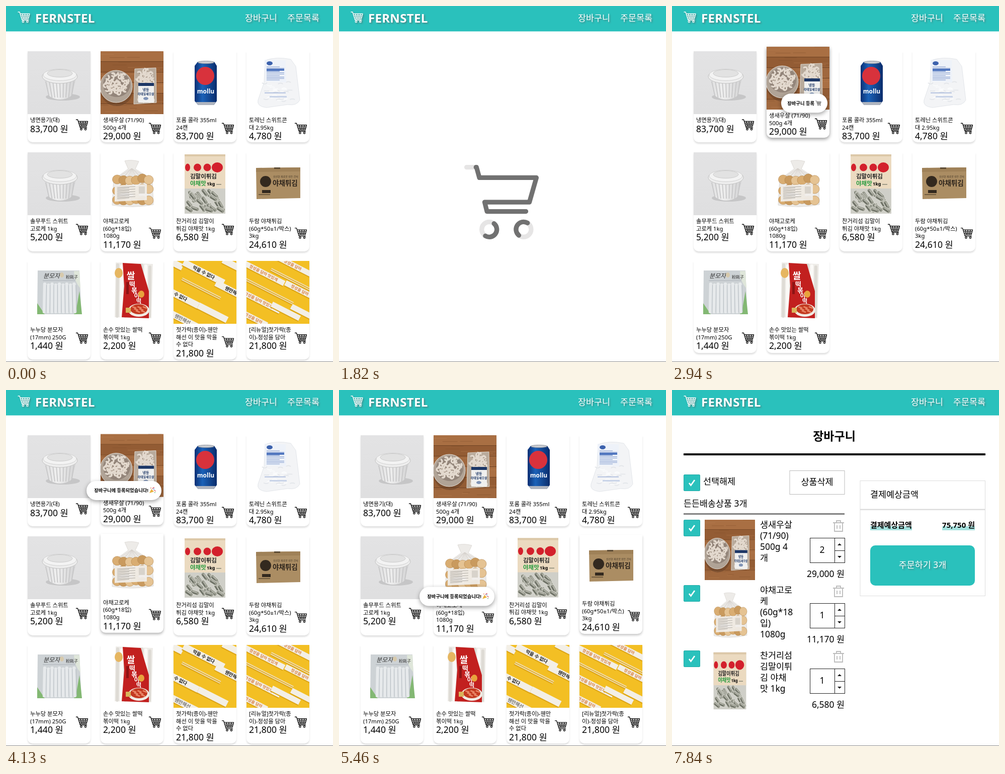
An HTML page that plays this animation: 650 px wide and 708 px high, repeating every 8 s.

```html
<!DOCTYPE html>
<html lang="ko">
<head>
<meta charset="utf-8">
<style>
html, body { margin: 0; width: 100%; height: 100%; overflow: hidden; background: #fff; }
svg { display: block; }
text { font-family: "Noto Sans", "Noto Sans CJK KR", "Noto Sans CJK", sans-serif; }
.glow { filter: drop-shadow(2px 2px 1.5px rgba(90, 90, 90, .55)); }
.bubble { filter: drop-shadow(0 3px 4px rgba(0, 0, 0, .38)); }
</style>
</head>
<body>
<svg id="stage" width="650" height="708" viewBox="0 0 650 708"></svg>
<script>
const TEAL = '#2ac1bc';
const rect = (x, y, w, h, fill, more = '') => `<rect x="${x}" y="${y}" width="${w}" height="${h}" fill="${fill}" ${more}/>`;
const oval = (x, y, rx, ry, fill, more = '') => `<ellipse cx="${x}" cy="${y}" rx="${rx}" ry="${ry}" fill="${fill}" ${more}/>`;
const shape = (d, fill, more = '') => `<path d="${d}" fill="${fill}" ${more}/>`;
const line = (d, color, w = 1, more = '') => `<path d="${d}" fill="none" stroke="${color}" stroke-width="${w}" ${more}/>`;
const text = (x, y, size, str, more = '') => `<text x="${x}" y="${y}" font-size="${size}" ${more}>${str}</text>`;
const group = (tf, body, more = '') => `<g transform="${tf}" ${more}>${body}</g>`;
const at = (x, y) => `translate(${x} ${y})`;
const times = (n, f) => Array.from({ length: n }, (_, i) => f(i)).join('');
const BOLD = 'font-weight="700"', MID = 'text-anchor="middle"', END = 'text-anchor="end"';
let seed = 11;
const rnd = (a, b) => a + (b - a) * ((seed = seed * 16807 % 2147483647) / 2147483647);

// ---- product pictures, each 125 x 125 ----
const bowl = rect(0, 0, 125, 125, 'url(#grey)') + oval(70, 91, 34, 7, '#c6c6c7') +
  shape('M31 50L41 88Q65 104 88 88L97 50Z', 'url(#shade)') +
  times(9, i => line(`M${36 + i * 7} 60L${43 + i * 5.5} 92`, '#c4c4c5', 1.6)) +
  oval(64, 50, 35, 14, '#eeeeee', 'stroke="#c2c2c2"') + oval(64, 47, 33, 11.5, '#f3f3f3', 'stroke="#cfcfcf"') +
  oval(64, 44, 25, 7.5, '#e2e2e2', 'stroke="#cbcbcb"');

const curls = (n, x, y, rx, ry) => times(n, () => {
  const a = rnd(0, 6.3), r = Math.sqrt(rnd(0, 1));
  return group(`translate(${x + rx * r * Math.cos(a)} ${y + ry * r * Math.sin(a)}) rotate(${rnd(0, 360)})`,
    line('M-3.5 1.5A3.6 3.6 0 1 1 3 2.5', '#e3d9ce', 3.4) + line('M-1.5 1A1.7 1.7 0 0 1 1.6 1', '#8f7d6d', 1));
});
const shrimp = rect(0, 0, 125, 125, '#a0683d') +
  times(6, i => rect(0, i * 21, 125, 20, ['#a96f43', '#935c34', '#a0683e'][i % 3]) + rect(0, i * 21 + 20, 125, 1, '#6e4223')) +
  times(40, i => line(`M${rnd(-10, 110)} ${rnd(0, 125)}h${rnd(10, 35)}`, i % 2 ? '#7f4e2a' : '#bb8252', .8, 'opacity=".6"')) +
  oval(32, 75, 33, 34, '#5c3a24', 'opacity=".45"') + oval(31, 70, 32, 32, '#b0a396', 'stroke="#e4ded6"') +
  oval(32, 66, 27, 25, '#93857a') + curls(56, 32, 65, 23, 21) +
  shape('M68 35L110 33L111 102L66 105Z', '#b9ab9c', 'stroke="#ddd5cb"') + curls(38, 89, 54, 16, 16) + curls(14, 89, 94, 16, 6) +
  rect(75, 63, 31, 39, '#f0f0ef') + rect(75, 63, 31, 6, '#1d3766') + text(90, 79, 7, '냉동', BOLD + MID + ' fill="#1d3766"') +
  text(90, 87, 6, '칵테일새우살', BOLD + MID + ' fill="#1d3766"') + oval(90, 94, 5, 3, '#7f93b5');

const can = rect(0, 0, 125, 125, '#fff') + shape('M48 21H81L86 29V99L80 107H49L42 99V29Z', 'url(#blue)') +
  oval(64.5, 22, 16, 2.6, '#c9ccd2', 'stroke="#8d929a"') + shape('M44 101H84L80 107H49Z', '#aeb4bf') +
  oval(63, 49, 18, 18, '#d8323c') + text(64, 84, 12, 'mollu', BOLD + MID + ' fill="#fff"');

const corn = rect(0, 0, 125, 125, '#fff') + shape('M37 18Q60 10 88 16L98 30L106 97Q100 109 82 106L40 112Q20 110 23 97L35 62Z', '#f3f4f6', 'stroke="#e3e6ea"') +
  times(26, i => line(`M${rnd(30, 88)} ${rnd(60, 100)}q5 ${rnd(-6, 6)} 10 0`, i % 2 ? '#e2e5e9' : '#fbfcfd', 1.6)) +
  shape('M36 17L78 18L79 62L37 60Z', '#eef2f9') + oval(46, 24, 6, 4, '#3d62ad') +
  times(10, i => line(`M40 ${31 + i * 2.9}h${i % 3 ? 35 : 26}`, i == 2 || i == 3 ? '#4b72bd' : '#8fa6d3', i == 2 ? 4 : 1.2)) +
  rect(36, 82, 42, 1.5, '#a3b5da') + rect(46, 89, 34, 3, '#c8d3e8');

const buns = rect(0, 0, 125, 125, '#fff') + shape('M48 17Q62 14 76 18L69 33L103 55L105 104Q64 112 23 105L26 54L55 33Z', '#edebe8', 'stroke="#dedbd7"') +
  times(11, i => line(`M62 32L${28 + i * 7} ${54 + i % 2 * 4}`, '#d3cfca', .8)) +
  times(18, i => oval(33 + i % 6 * 12.5, 54 + Math.floor(i / 6) * 20 + rnd(-3, 3), 9.5, 9, ['#d9ad72', '#c99a5e', '#e5c393'][i % 3], 'stroke="#b0834b" stroke-width=".6"')) +
  shape('M28 66L92 63L92 95L28 98Z', '#f1efec', 'opacity=".92"') +
  times(10, i => line(`M33 ${70 + i * 2.5}l${i % 2 ? 24 : 36} -2`, '#9f9b95', .8)) + rect(76, 68, 12, 14, '#d8d3cb');

const rolls = rect(0, 0, 125, 125, '#fff') + rect(22, 4, 81, 118, '#cfcfc8') +
  times(36, () => group(`translate(${rnd(28, 95)} ${rnd(78, 116)}) rotate(${rnd(15, 75)})`,
    rect(-9, -4, 18, 8, '#95978b', 'rx="4" stroke="#dcdcd4"') + line('M-6 1.5H5', '#565a50', 2, 'opacity=".7"') + line('M-5-1.5H4', '#c9cac0', 1))) +
  rect(22, 4, 81, 68, '#ebdac0') + rect(22, 4, 81, 4, '#dcc8a8') +
  times(3, i => oval(28 + i * 19.5, 30, i ? 7.5 : 5, 7.5, '#d3202c')) + oval(87, 30, 11, 10, '#d3202c') +
  text(33, 52, 11.5, '김말이튀김', BOLD + ' fill="#222"') + text(33, 66, 11.5, '야채맛', BOLD + ' fill="#279b3e"') + text(66, 66, 9, '1kg', BOLD) + rect(85, 63, 10, 1.5, '#887');

const box = rect(0, 0, 125, 125, '#fff') + shape('M19 31L107 30V91L20 93Z', '#ab8d63') + shape('M19 31L107 30V38L19 39Z', '#9f8158') +
  oval(38, 58, 11, 11, '#33291f') + text(52, 66, 13.5, '야채튀김', BOLD + ' fill="#2d241c"') +
  text(53, 50, 5, '신선한 재료로 만든 간식', 'fill="#493b2b"') + rect(31, 75, 17, 6, '#33291f') + rect(24, 83, 23, 2, '#705b3e') + rect(55, 30, 12, 3, '#5d4c35');

const noodles = rect(0, 0, 125, 125, '#fff') + shape('M20 19H103L107 106H19Z', '#cdd2d5') +
  shape('M19 84L34 106H19Z M103 60L108 106H92L97 94Z', '#83b873') + shape('M92 20H103L105 55Q92 40 92 20', '#dfe6da') +
  times(9, i => line(`M${34 + i * 7.3} ${46 + i % 2 * 2}L${33 + i * 7.6} 101`, '#e6e9eb', 6.4, 'stroke-linecap="round"') + line(`M${37.5 + i * 7.3} 48L${36.5 + i * 7.6} 102`, '#b3bac0', 1)) +
  text(31, 34, 12, '분모자', 'fill="#333" font-style="italic"') + text(76, 35, 8, '粉耗子', 'fill="#333"') + oval(68, 28, 4, 5, '#d7c9ac') + line('M30 39H95', '#a2a9b0', .8);

const sticks = rect(0, 0, 125, 125, '#fff') + shape('M30 3L104 6L101 114L28 112Z', '#eeece8') +
  times(9, i => line(`M${34 + i * 8} ${8 + i % 3 * 2}L${33 + i * 8} 110`, i % 2 ? '#fbfaf7' : '#dedbd5', 6, 'stroke-linecap="round"')) +
  shape('M44 4L80 6L96 60V114L42 112L47 50Z', '#c2201f') +
  [['쌀', 60, 36, 18], ['떡', 63, 51, 13], ['볶', 67, 63, 13], ['이', 72, 74, 12], ['떡', 76, 84, 11]].map(([c, x, y, s]) => text(x, y, s, c, BOLD + MID + ' fill="#fff"')).join('') +
  oval(36, 24, 8, 10, '#e6b661') + rect(51, 42, 5, 24, '#8d1414') + oval(81, 66, 6, 7, '#e8a33c') + oval(76, 98, 21, 13, '#f1ebe3') + oval(76, 96, 17, 10, '#c43a20') +
  times(7, i => line(`M${63 + i * 3.5} ${91 + i % 3 * 4}l8 3`, '#e98767', 2.5)) + rect(50, 93, 10, 10, '#d9b35b');

const strip = (x, y, w, h, str, color) => group(`translate(${x} ${y}) rotate(27)`,
  rect(-w / 2, 2 - h / 2, w, h, '#dba417') + rect(-w / 2, -h / 2, w, h, '#f3efe6') + text(0, h * .26, h * .72, str, BOLD + MID + ` fill="${color}"`));
const pair = (x, y, w) => group(`translate(${x} ${y}) rotate(27)`, rect(0, 2, w, 5.5, '#dba417') + rect(0, 0, w, 2, '#f0dcae') + rect(0, 3.5, w, 2, '#f0dcae'));
const yellow = rect(0, 0, 125, 125, '#f3bf24');
const paperA = yellow + strip(0, 4, 40, 13, '', '#222') + strip(60, 23, 90, 13, '막을 수 없다', '#222') + strip(118, 61, 76, 13, '웬만해선', '#222') +
  strip(14, 71, 84, 13, '수 없다', '#222') + strip(78, 103, 64, 13, '', '#222') + strip(18, 116, 64, 13, '웬만해선', '#777') + strip(118, 8, 44, 13, '', '#222') + pair(18, 33, 86);
const paperB = yellow + strip(34, 24, 92, 11, '정성을 담아 맛있게', '#d98243') + strip(106, 58, 64, 11, '정성을 담아', '#d98243') + strip(92, 8, 80, 11, '정성을 담아', '#d98243') +
  strip(24, 78, 96, 11, '정성을 담아 맛있게', '#d98243') + strip(78, 100, 62, 11, '', '#222') + strip(14, 114, 60, 11, '정성을 담아', '#d98243') +
  strip(116, 104, 60, 11, '', '#222') + pair(50, 14, 90) + pair(-4, 32, 110);

const pictures = { bowl, shrimp, can, corn, buns, rolls, box, noodles, sticks, paperA, paperB };
const products = [
  ['bowl', '냉면용기(대)', '83,700'], ['shrimp', '생새우살 (71/90)|500g 4개', '29,000'],
  ['can', '포롬 콜라 355ml|24캔', '83,700'], ['corn', '토레닌 스위트콘|대 2.95kg', '4,780'],
  ['bowl', '솔무푸드 스위트|고로케 1kg', '5,200'], ['buns', '야채고로케|(60g*18입)|1080g', '11,170'],
  ['rolls', '찬거리섬 김말이|튀김 야채맛 1kg', '6,580'], ['box', '두람 야채튀김|(60g*50±1/박스)|3kg', '24,610'],
  ['noodles', '누누당 분모자|(17mm) 250G', '1,440'], ['sticks', '손수 맛있는 쌀떡|볶이떡 1kg', '2,200'],
  ['paperA', '젓가락(종이)-웬만|해선 이 맛을 막을|수 없다', '21,800'], ['paperB', '[리뉴얼]젓가락(종|이)-정성을 담아', '21,800']
].map(([pic, title, price], i) => {
  const lines = title.split('|'), row = i >> 2;
  return { pic, lines, price, row, x: 43 + i % 4 * 145, y: [90, 291, 507][row], h: [181, 197, 196][row], icon: 146 + 7.3 * (lines.length - 1) };
});

const trolley = (x, y, color, w, s = 1) => group(`translate(${x} ${y}) scale(${s})`,
  `<g fill="none" stroke="${color}" stroke-width="${w}" stroke-linejoin="round" stroke-linecap="round">` +
  '<path d="M-11.5-10H-8.5L-3.5 6H9.5M-7.5-6.5H11.5L8.8 3.5H-4.2M-6.5-3.2H10.7M-5.3 .2H9.7M-3-6.5L-.6 3.5M2-6.5L2.4 3.5M7-6.5L5.6 3.5"/>' +
  '<circle cx="-1.5" cy="9" r="1.7"/><circle cx="7" cy="9" r="1.7"/></g>');
const popper = (x, y) => group(at(x, y), shape('M-6 5L-2-3L3 2Z', '#e9b23c') + line('M0-3Q1-6 4-6M3 0Q6-1 6 2', '#d65a6a', 1.2) +
  oval(3, -3, 1, 1, '#4a9be0') + oval(-3, -5, .9, .9, '#e06a3a') + oval(5, 4, .9, .9, '#58b368'));

const card = (p, i) => `<g id="card${i}">` + rect(0, 0, 125, p.h, '#fff', 'rx="10"') +
  `<use href="#${p.pic}" clip-path="url(#frame)"/>` +
  p.lines.map((s, k) => text(5, 141 + 14.6 * k, 11.3, s, 'font-weight="500"')).join('') +
  text(5, 160.7 + 14.7 * (p.lines.length - 1), 17.6, p.price + ' 원') + trolley(108, p.icon, '#111', 1.4) + '</g>';

const bubble = (id, w, str, icon) => `<g id="${id}">` + rect(-w, -19, w, 38, '#fff', 'rx="19" class="bubble"') +
  text(-26, 3.5, 9.3, str, BOLD + END) + icon + '</g>';

const POLY = 'points="4,4 21,4 26,22 124,22 112,64 35,64 39,80 106,80"';
const wheel = (x, more = '') => `<circle cx="${x}" cy="111" r="13" ${more}/>`;
const loader = group('translate(249 316) scale(1.15625)',
  `<g stroke="#e6e5e5">` + `<polyline ${POLY}/>` + wheel(43) + wheel(102) + '</g><g stroke="#717171">' +
  `<polyline id="body" ${POLY} stroke-dasharray="338"/>` + wheel(43, 'id="w1" stroke-dasharray="81.68"') + wheel(102, 'id="w2" stroke-dasharray="81.68"') + '</g>',
  'id="loader" fill="none" stroke-width="8" stroke-linecap="round" stroke-linejoin="round"');

const S = 17.4;
const check = y => rect(23.5, y + .5, 32, 32, TEAL, 'rx="1.5" stroke="#25aca8"') + line(`M34 ${y + 17}l3.5 4.5L45 ${y + 11}`, '#fff', 2.8);
const trash = (x, y) => line(`M${x - 11} ${y - 6}h22M${x - 4} ${y - 6}v-4h8v4M${x - 8} ${y - 6}v17h16v-17M${x - 3} ${y - 1}v7M${x + 3} ${y - 1}v7`, '#bcbcbc', 1.8);
const cartRow = (n, y, lines) => {
  const p = products[n];
  return check(y) + group(`translate(65 ${y}) scale(.8 .96)`, `<use href="#${p.pic}" clip-path="url(#frame)"/>`) +
    lines.split('|').map((s, k) => text(175, y + 15.5 + 22 * k, S, s)).join('') + trash(331, y + 12) +
    rect(274.5, y + 36.5, 69, 49, '#fff', 'stroke="#222"') + line(`M323.5 ${y + 36}v50M323 ${y + 61.5}h20`, '#222') +
    shape(`M329 ${y + 51}l4-4 4 4ZM329 ${y + 72}l4 4 4-4Z`, '#111') +
    text(298.5, y + 66, S, '1', MID + ` id="qty${n}"`) + text(343, y + 113.5, S, p.price + ' 원', END);
};
const basket = '<g id="basket">' + text(322.5, 99.5, 23, '장바구니', BOLD + MID) + rect(23, 126, 600, 4, '#000') +
  check(168) + text(62, 188, S, '선택해제') + rect(234, 160.5, 109, 47, '#fff', 'stroke="#bbb"') + text(288.5, 189, S, '상품삭제', MID) +
  text(23, 231.5, S, '든든배송상품 3개') + rect(23, 245, 320, 3, '#808080') +
  cartRow(1, 258, '생새우살|(71/90)|500g 4|개') + cartRow(5, 388, '야채고로|케|(60g*18|입)|1080g') + cartRow(6, 518, '찬거리섬|김말이튀|김 야채|맛 1kg') +
  rect(374, 180.5, 248.5, 229, '#fff', 'stroke="#ddd"') + rect(374, 236.5, 249, 2.5, '#ddd') + text(394, 213.5, S, '결제예상금액') +
  rect(394, 271, 83, 8, '#a5e2df') + rect(537, 271, 65, 8, '#a5e2df') + text(394, 273.5, 15, '결제예상금액', BOLD) + text(602, 273.5, 15, '', BOLD + END + ' id="total"') +
  rect(394, 309, 208, 80, TEAL, 'rx="10"') + text(498, 354, S, '주문하기 3개', MID + ' fill="#fff" class="glow"') + '</g>';

const $ = id => document.getElementById(id);
$('stage').innerHTML = `<defs><clipPath id="frame"><rect width="125" height="125"/></clipPath>
<linearGradient id="grey" x2="0" y2="1"><stop stop-color="#e3e3e4"/><stop offset="1" stop-color="#dfdfe0"/></linearGradient>
<linearGradient id="shade"><stop stop-color="#dcdcdd"/><stop offset=".4" stop-color="#efefef"/><stop offset="1" stop-color="#d2d2d3"/></linearGradient>
<linearGradient id="blue"><stop stop-color="#0b2f74"/><stop offset=".35" stop-color="#1b62b8"/><stop offset="1" stop-color="#0a2c6c"/></linearGradient>` +
  Object.entries(pictures).map(([id, art]) => `<g id="${id}">${art}</g>`).join('') + '</defs>' +
  rect(0, 0, 650, 708, '#fff') + '<g id="shop">' + products.map(card).join('') +
  times(3, i => `<g id="pop${i}">` + bubble('ask' + i, 92, '장바구니 등록', trolley(-18, 0, '#777', 1.9, .46)) + bubble('done' + i, 149, '장바구니에 등록되었습니다!', popper(-18, 0)) + '</g>') + '</g>' +
  loader + basket + rect(0, 0, 650, 50.5, TEAL) + '<g class="glow">' + trolley(35.5, 22, '#fff', 1.3) +
  text(58, 32.5, 24, 'FERNSTEL', BOLD + ' fill="#fff" letter-spacing=".3"') + text(475, 30, S, '장바구니', 'fill="#fff"') + text(559, 30, S, '주문목록', 'fill="#fff"') + '</g>' +
  rect(0, 707, 650, 1, '#8c8c8c');

// ---- motion ----
const clamp = v => Math.min(1, Math.max(0, v));
const ease = v => { // cubic-bezier(.42, 0, .58, 1)
  let lo = 0, hi = 1;
  for (let i = 0; i < 20; i++) {
    const s = (lo + hi) / 2, x = 1.26 * s * (1 - s) ** 2 + 1.74 * s * s * (1 - s) + s ** 3;
    x < clamp(v) ? lo = s : hi = s;
  }
  return lo * lo * (3 - 2 * lo);
};
const show = (id, on) => $(id).style.display = on ? '' : 'none';

const RELOAD = 980, LOADED = 2520, MORE = 3150, CART = 6650, PLUS = 7840, RISE = 250;
// card, pointer enters, pointer leaves
const hovers = [[1, 2600, 3970], [5, 3995, 4850], [6, 4950, 5090], [7, 5130, 5310], [6, 5420, 6170], [3, 6237, 6420]];
// card, button appears, confirmation appears, confirmation goes
const popups = [[1, 2840, 3780, 4550], [5, 4340, 4690, 5500], [6, 5670, 5800, 6600]];
const lift = (n, t) => hovers.reduce((sum, [c, on, off]) => c == n ? sum + ease((t - on) / RISE) - ease((t - off) / RISE) : sum, 0);

function draw(t) {
  const loading = t >= RELOAD && t < LOADED, cart = t >= CART;
  show('shop', !loading && !cart);
  show('loader', loading);
  show('basket', cart);
  if (loading) {
    const ph = (t - 975) / 2000, half = ph < .5, e = ease(half ? 2 * ph : 2 * ph - 1);
    $('body').setAttribute('stroke-dashoffset', half ? -338 * (1 - e) : 338 * e);
    [[43, -90], [102, 90]].forEach(([x, a], i) => {
      $('w' + (i + 1)).setAttribute('stroke-dashoffset', half ? 81.68 - 40.84 * e : 40.84 + 40.84 * e);
      $('w' + (i + 1)).setAttribute('transform', `rotate(${a + 1080 * ease(ph)} ${x} 111)`);
    });
  } else if (cart) {
    $('qty1').textContent = t < PLUS ? 1 : 2;
    $('total').textContent = (t < PLUS ? '46,750' : '75,750') + ' 원';
  } else {
    const full = t < RELOAD || t >= MORE;
    products.forEach((p, i) => {
      const up = lift(i, t), el = $('card' + i);
      show('card' + i, full || i < 10);
      el.setAttribute('transform', at(p.x, p.y - 9 * up));
      el.style.filter = `drop-shadow(0 3px ${1.5 + 2 * up}px rgba(0,0,0,${.12 + .28 * up}))`;
      if (p.row == 2) el.firstChild.setAttribute('height', full ? p.h : 183);
    });
    popups.forEach(([n, ask, done, gone], i) => {
      const p = products[n];
      show('pop' + i, t >= ask && t < gone);
      show('ask' + i, t < done);
      show('done' + i, t >= done);
      $('pop' + i).setAttribute('transform', at(p.x + 121, p.y + p.icon - 41 - 9 * lift(n, t)));
      $('pop' + i).style.opacity = clamp((t - ask) / 80);
    });
  }
}
function tick() {
  draw(performance.now() % 8000);
  requestAnimationFrame(tick);
}
tick();
</script>
</body>
</html>
```
